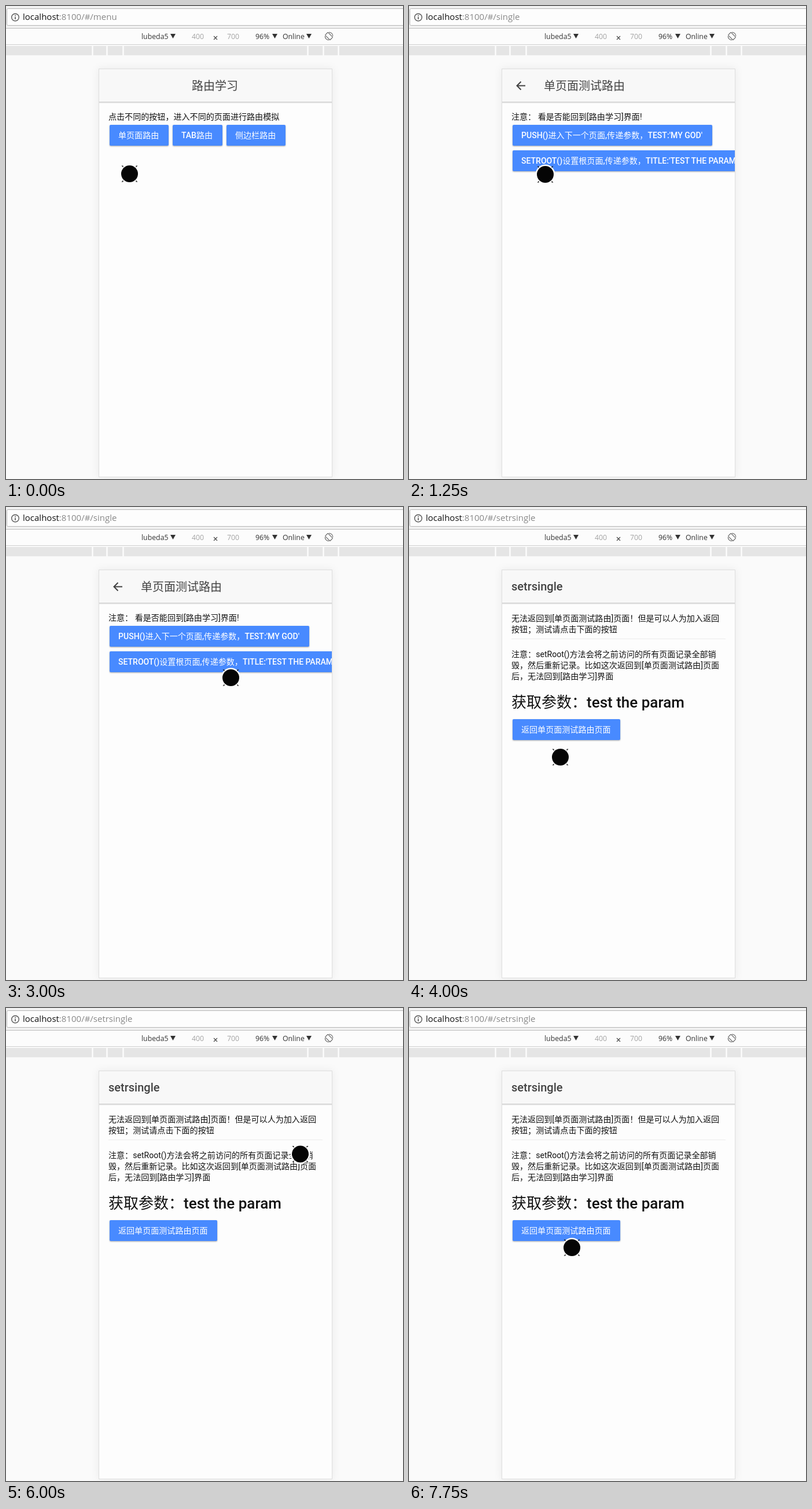
Write an HTML page that moves like this. It is 686 px wide and 816 px high and loops after 8000 ms.

```html
<!DOCTYPE html>
<html lang="zh-CN">
<head>
<meta charset="utf-8">
<style>
html, body { margin: 0; width: 100%; height: 100%; overflow: hidden; background: #fafafa; }
svg { display: block; }
text { font: 14.07px Roboto, "Noto Sans CJK SC", sans-serif; fill: #111; white-space: pre; }
.url { font: 15px "Open Sans", sans-serif; }
.bar text { font: 12.3px "Open Sans", sans-serif; fill: #333; }
.bar .dim, .url .dim { fill: #888; }
.bar .dim { fill: #a4a4a4; }
.title { font-size: 20px; fill: #424242; }
.head { font-size: 26px; }
.latin { font-weight: 500; }
.btn rect { fill: #488aff; filter: drop-shadow(0 1.5px 1px #0005); }
.btn text { fill: #fff; font-weight: 500; }
</style>
</head>
<body>
<svg width="686" height="816" viewBox="0 0 686 816">
  <defs><clipPath id="screen"><rect x="161" y="109" width="402" height="703"/></clipPath></defs>

  <rect width="686" height="38" fill="#f2f2f2"/>
  <rect x="1.5" y="4.5" width="700" height="29" rx="2" fill="#fdfdfd" stroke="#b4b4b4"/>
  <circle cx="16" cy="19.5" r="6.3" fill="none" stroke="#555" stroke-width="1.4"/>
  <path d="M16 18.5v4.5M16 15.5v1.7" stroke="#555" stroke-width="1.6"/>
  <text class="url" x="29" y="24">localhost<tspan class="dim" id="path"></tspan></text>

  <rect y="38" width="686" height="29" fill="#fcfcfc"/>
  <path d="M0 38.5H686" stroke="#bdbdbd"/>
  <path d="M0 66.5H686" stroke="#cfcfcf"/>
  <g class="bar">
    <text x="234" y="57">lubeda5</text>
    <text x="321" y="57" class="dim">400</text>
    <text x="382" y="57" class="dim">700</text>
    <text x="431" y="57">96%</text>
    <text x="478" y="57">Online</text>
    <path d="M284 48h9l-4.5 8zM460 48h9l-4.5 8zM519 48h9l-4.5 8z" fill="#333"/>
    <path d="M359 52l6 6m0-6l-6 6" stroke="#444" stroke-width="1.1"/>
    <g fill="none" stroke="#666" stroke-width="1.1">
      <rect x="554.5" y="46" width="7" height="12" rx="1" transform="rotate(-45 558 52)"/>
      <path d="M558 45.2A6.8 6.8 0 0 1 564.8 52M558 58.8A6.8 6.8 0 0 1 551.2 52"/>
    </g>
  </g>
  <rect y="69" width="686" height="16" fill="#e5e5e5"/>
  <path d="M149.500 69v16M174.500 69v16M202.500 69v16M521.500 69v16M548.500 69v16M574.500 69v16" stroke="#fcfcfc" stroke-width="2.500"/>

  <rect x="160.500" y="108.500" width="403" height="704" fill="#fdfdfd" stroke="#dedede" style="filter:drop-shadow(0 0 7px #0001)"/>
  <g clip-path="url(#screen)">
    <rect x="161" y="109" width="402" height="56" fill="#f8f8f8"/>
    <path d="M161 165.500h402" stroke="#d2d2d2"/>
    <path d="M161 166.500h402" stroke="#dfdfdf"/>
    <path d="M161 167.500h402" stroke="#f0f0f0"/>

    <g class="page">
      <text class="title" x="321" y="145">路由学习</text>
      <text x="177" y="196">点击不同的按钮，进入不同的页面进行路由模拟</text>
      <g class="btn">
        <rect x="179" y="205" width="102" height="36" rx="2"/><text x="194" y="228">单页面路由</text>
        <rect x="288" y="205" width="86" height="36" rx="2"/><text x="303" y="228">TAB路由</text>
        <rect x="381" y="205" width="102" height="36" rx="2"/><text x="396" y="228">侧边栏路由</text>
      </g>
    </g>

    <g class="page">
      <path d="M201 137.500H186.500M193.500 130.500l-7 7 7 7" fill="none" stroke="#424242" stroke-width="2"/>
      <text class="title" x="233" y="145">单页面测试路由</text>
      <text x="177" y="196">注意： 看是否能回到[路由学习]界面!</text>
      <g class="btn">
        <rect x="179" y="205" width="345" height="36" rx="2"/>
        <text x="194" y="228">PUSH()进入下一个页面,传递参数，TEST:'MY GOD'</text>
        <rect x="179" y="249" width="420" height="36" rx="2"/>
        <text x="194" y="272">SETROOT()设置根页面,传递参数，TITLE:'TEST THE PARAM'</text>
      </g>
    </g>

    <g class="page">
      <text class="title latin" x="177" y="144">setrsingle</text>
      <text x="177" y="197">无法返回到[单页面测试路由]页面！但是可以人为加入返回</text>
      <text x="177" y="216">按钮；测试请点击下面的按钮</text>
      <path d="M177 227.500h370" stroke="#ececec"/>
      <text x="177" y="259">注意：setRoot()方法会将之前访问的所有页面记录全部销</text>
      <text x="177" y="278">毁，然后重新记录。比如这次返回到[单页面测试路由]页面</text>
      <text x="177" y="297">后，无法回到[路由学习]界面</text>
      <text class="head" x="177" y="346">获取参数：<tspan class="latin">test the param</tspan></text>
      <g class="btn">
        <rect x="179" y="366" width="186" height="36" rx="2"/><text x="194" y="389">返回单页面测试路由页面</text>
      </g>
    </g>
  </g>

  <g id="cursor">
    <circle r="17" fill="#fdfdfd"/>
    <circle r="14.500" fill="#050505"/>
    <path d="M-14-14h3v3zM14-14h-3v3zM-14 14h3v-3zM14 14h-3v-3z" fill="#111"/>
  </g>
</svg>
<script>
const STEP = 250, LOOP = 8000;
const pages = [...document.querySelectorAll('.page')];
const path = document.getElementById('path');
const cursor = document.getElementById('cursor');
const routes = ['menu', 'single', 'setrsingle'];

// Pointer position, sampled once per step
const trail = [
  [213.5, 289.5], [222, 270], [232, 254], [238, 242.5],
  [237, 236], [235.5, 290.5], [236, 284], [240, 288],
  [369, 350], [381, 326], [388, 304], [388, 298],
  [388.5, 294.5], [389, 277], [390, 278], [397, 465],
  [261.5, 431.5], [197, 412], [250, 300], [425, 217],
  [420, 240], [420, 240], [445, 246], [477, 250],
  [508.5, 252], [615, 340], [575, 465], [480, 455],
  [390, 440], [325, 426], [292, 418], [281.5, 413.5]
];

function draw(now) {
  const t = now % LOOP;
  const page = t < 1250 ? 0 : t < 3500 ? 1 : 2;
  const [x, y] = trail[Math.floor(t / STEP)];
  pages.forEach((p, i) => p.style.display = i === page ? '' : 'none');
  path.textContent = ':8100/#/' + routes[page];
  cursor.setAttribute('transform', `translate(${x} ${y})`);
}

const start = performance.now();
function tick() {
  draw(performance.now() - start);
  requestAnimationFrame(tick);
}
tick();
</script>
</body>
</html>
```
